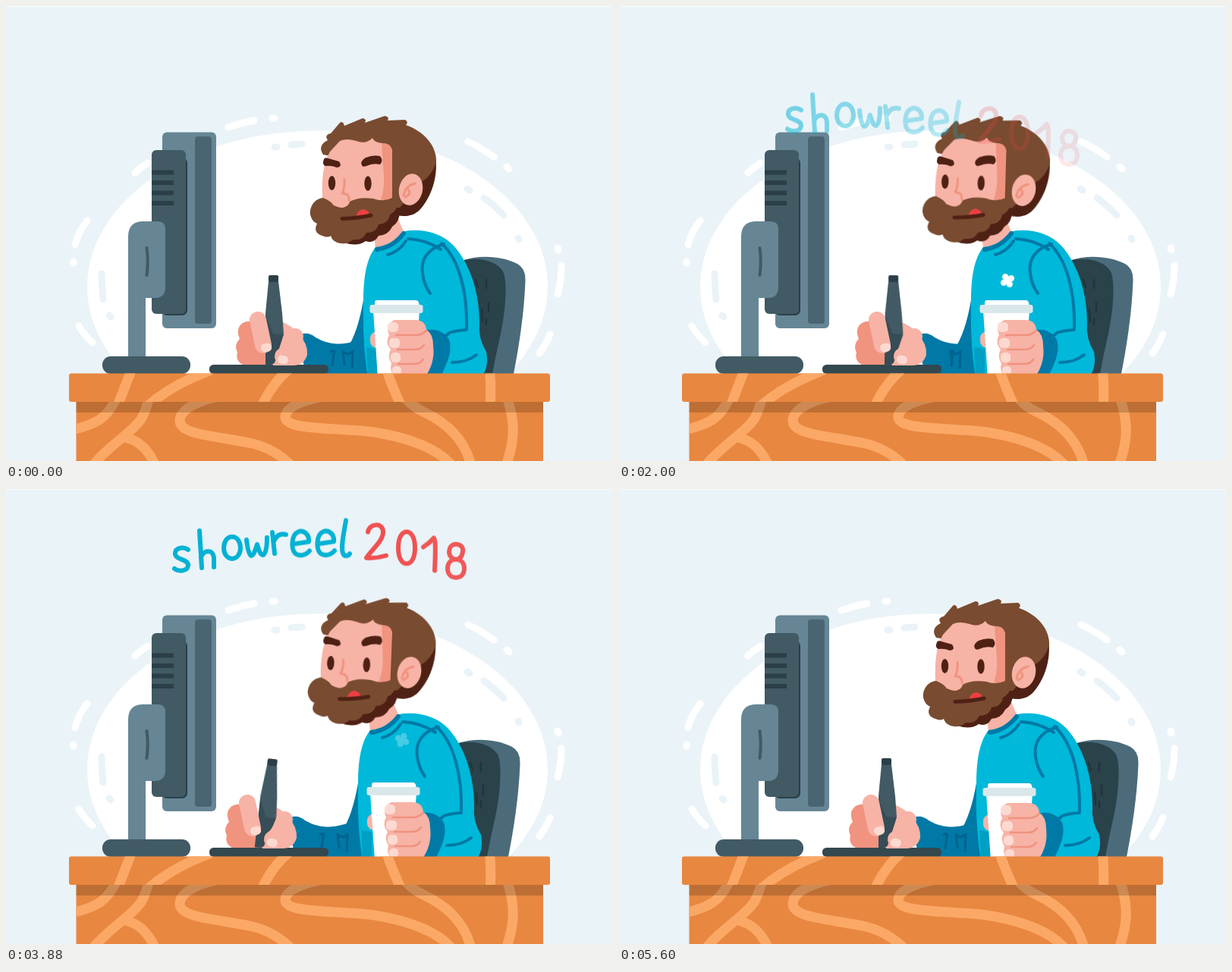
These frames come from a looping animation (800 by 600 pixels, 5.64 s). An HTML page without scripts:

```html
<!DOCTYPE html>
<html lang="en">
<head>
<meta charset="utf-8">
<title>Showreel</title>
<style>
html, body { margin: 0; width: 100%; height: 100%; overflow: hidden; background: #eaf3f8; }
svg { display: block; width: 100vw; height: 100vh; }

:root {
  --loop: 5.64s;
  --skin: #f7b3a6; --blush: #f0937f; --nail: #fddad1;
  --hair: #794b30; --dark: #4f2114;
  --shirt: #00b8d9; --navy: #0079a6;
  --steel: #668696; --slate: #415a64; --coal: #2b3f48;
}

.line { fill: none; stroke-linecap: round; stroke-linejoin: round; }
.move { animation: var(--loop) ease-in-out infinite; }

.chair, .body { animation-name: sway; }
.cup { animation-name: cup; }
.head { animation-name: nod; transform-origin: 534px 242px; }
.brows { animation-name: brows; }
.tongue { animation-name: lick; }
.hand { animation-name: draw; }
.pen { animation-name: tilt; transform-origin: 350px 470px; }
.puff { animation: steam 805.714ms -711.714ms infinite; }

@keyframes sway {
  0%, 99.29%, 100% { transform: none; }
  16.31% { transform: translateX(-9px); }
  35.46% { transform: translateX(-7px); }
  56.03% { transform: translateX(-10px); }
  68.79% { transform: translateX(-7px); }
  78.72% { transform: translateX(-8px); }
}
@keyframes cup {
  0%, 99.29%, 100% { transform: none; }
  16.31% { transform: translate(-5px, -1px); }
  35.46% { transform: translate(-4px, 0); }
  56.03% { transform: translate(-8px, 0); }
  68.79% { transform: translate(-4px, -1px); }
  78.72% { transform: translate(-6px, 2px); }
}
@keyframes nod {
  0%, 99.29%, 100% { transform: none; }
  16.31% { transform: translate(-4px, 1px) rotate(3deg); }
  35.46% { transform: translate(0, 1px) rotate(1.6deg); }
  56.03% { transform: translate(-18px, 0) rotate(-4deg); }
  68.79% { transform: translate(-2px, 0) rotate(2.2deg); }
  78.72% { transform: translate(-11px, 0) rotate(-3.2deg); }
}
@keyframes brows {
  0%, 35.46%, 78.72%, 100% { transform: none; }
  56.03% { transform: translate(2px, -5px); }
}
@keyframes lick {
  0%, 56.03%, 99.29%, 100% { transform: none; }
  78.72% { transform: translate(-14px, 1px); }
}
@keyframes draw {
  0%, 99.29%, 100% { transform: none; }
  8.16% { transform: translateX(9px); }
  16.31% { transform: translateX(-7px); }
  25.9% { transform: translateX(-12px); }
  35.46% { transform: translateX(8px); }
  45.7% { transform: translateX(-11px); }
  56.03% { transform: translateX(-7px); }
  62.4% { transform: translateX(8px); }
  68.79% { transform: translateX(-14px); }
  78.72% { transform: translateX(14px); }
  89% { transform: translateX(-8px); }
}
@keyframes tilt {
  0%, 99.29%, 100% { transform: none; }
  16.31% { transform: rotate(.3deg); }
  35.46% { transform: rotate(.6deg); }
  56.03% { transform: rotate(5deg); }
  68.79% { transform: rotate(6.5deg); }
  78.72% { transform: rotate(-2deg); }
}
@keyframes steam {
  0% { transform: translate(504px, 389px) scale(.4); opacity: 1; }
  37% { transform: translate(516px, 362px) rotate(15deg); opacity: 1; }
  70% { transform: translate(526px, 332px) rotate(70deg); opacity: .28; }
  80% { transform: translate(526px, 330px) rotate(80deg); opacity: .08; }
  87%, 100% { transform: translate(526px, 328px) rotate(85deg); opacity: 0; }
}

.title path {
  transform-box: fill-box; transform-origin: 50% 50%;
  animation: rise var(--loop) infinite both, lean var(--loop) infinite both;
  animation-delay: calc(var(--i) * 80ms);
}
.title .zero { animation-delay: calc(var(--i) * 80ms), 80ms; }
@keyframes rise {
  0%, 5.674% { translate: 0 118px; opacity: 0; animation-timing-function: cubic-bezier(.37, 0, .63, 1); }
  64.18%, 79.43% { translate: 0 0; opacity: 1; }
  83.7%, 100% { translate: 0 0; opacity: 0; }
}
@keyframes lean {
  0%, 75.2% { transform: none; }
  77.3% { transform: skewX(-15deg); }
  83.7%, 100% { transform: none; }
}
</style>
</head>
<body>
<svg viewBox="0 0 800 600" role="img" aria-label="showreel 2018">
  <defs>
    <clipPath id="top"><rect x="83" y="484.500" width="634" height="37.500" rx="3"/></clipPath>
    <clipPath id="front"><rect x="92.500" y="522" width="615.500" height="78"/></clipPath>
  </defs>

  <rect width="800" height="600" fill="#eaf3f8"/>
  <rect width="800" height="1" fill="#f8fbfd"/>

  <!-- backdrop -->
  <ellipse cx="410.500" cy="370" rx="303.500" ry="205.500" fill="#fff"/>
  <g class="line" stroke="#fff" stroke-width="9">
    <path d="M293 160Q310 154 327 151M351 148h3M609 179Q627 187 643 199M660 212l3 3M170 220Q178 212 187 207"/>
    <path d="M107 283Q95 298 91 315M89 337v2M727 319l1 3M732 342Q732 362 727 380M96 422Q104 435 114 444M717 433Q712 446 703 458"/>
  </g>
  <g class="line" stroke="#eaf3f8" stroke-width="9">
    <path d="M354 186h3M376 183l14-1M608 241l3 2M630 253Q644 263 656 276M675 306l1 2M126 353Q126 371 128 387M136 408l2 2"/>
  </g>

  <!-- monitor -->
  <rect x="206" y="166.500" width="71" height="258.500" rx="6" fill="var(--steel)"/>
  <rect x="249" y="172" width="22" height="247" rx="4" fill="#4a6572"/>
  <rect x="205" y="200" width="34" height="208" rx="7" fill="var(--coal)"/>
  <rect x="192" y="190" width="45" height="216" rx="6" fill="var(--slate)"/>
  <path d="M192 219.500h29M192 233h29M192 246.500h29M192 260h29" stroke="var(--coal)" stroke-width="6"/>
  <path d="M161 465V304Q161 284 181 284H200Q210 284 210 294V371Q210 385 196 385H184V465Z" fill="var(--steel)"/>
  <path d="M185.500 319Q188 337 185.500 355" class="line" stroke="var(--slate)" stroke-width="4"/>
  <rect x="127" y="462" width="116" height="23" rx="11" fill="var(--slate)"/>

  <!-- chair -->
  <g class="move chair">
    <path d="M600 336C625 327 655 330 674 340Q685 346 684.500 362C683 405 676 450 668 490H600Z" fill="#4b6b7b"/>
    <path d="M600 336C625 330 647 337 655 350C661 362 659 400 652 432Q645 462 640 490H600Z" fill="#2a424a"/>
    <path d="M619 361l3 10M633 361v11M636 391v12M627 400l1 16M633 412v8" class="line" stroke="#1f343c" stroke-width="2.500"/>
  </g>

  <!-- far sleeve -->
  <g class="move hand">
    <path d="M384 437C391 429 401 431 408 437C425 447 443 447 456 443L510 430V488H396Z" fill="var(--navy)"/>
    <path d="M428 456Q434 452 432 459L430 474" class="line" stroke="#00638f" stroke-width="3"/>
  </g>

  <!-- torso -->
  <g class="move body">
    <path d="M484 285L487 322L526 302L514 274Z" fill="var(--skin)"/>
    <path d="M484 303Q504 298 516 280L512 270L484 285Z" fill="var(--blush)"/>
    <path d="M473 376C468 408 462 430 453 446L455 488H484V376Z" fill="var(--navy)"/>
    <path d="M487 318C476 332 471 354 471 390C470 425 472 462 477 490H626Q637 477 633 456Q622 438 624 418C624 380 613 342 590 316C574 299 548 293 525 297Q512 315 487 318Z" fill="var(--shirt)"/>
    <path d="M475 450L489 452V490H477Z" fill="#009fc4"/>
    <path d="M444 455l2 18M444 456Q452 462 457 455L456 477" class="line" stroke="#00638f" stroke-width="3"/>
    <g class="line" stroke="var(--navy)" stroke-width="4">
      <path d="M489 321Q510 318 524 300" stroke-width="6"/>
      <path d="M503 328Q518 324 527 310M530 307Q553 308 573 321"/>
      <path d="M577 314C556 320 546 334 549 353Q551 368 559 379M574 313C597 334 608 376 607 424"/>
      <path d="M560 432Q577 440 584 431Q592 428 607 427M588 470Q607 470 620 460"/>
    </g>
    <path d="M550 429C564 423 578 429 584 440C589 455 581 472 572 490H548Z" fill="var(--navy)"/>
  </g>

  <!-- head -->
  <g class="move head">
    <path d="M566 198C570 226 560 252 546 268C536 279 520 279 508 273L518 225Z" fill="var(--dark)"/>
    <path d="M446 312Q463 318 474 310Q485 314 491 303Q504 302 509 291Q519 285 519 270L500 262L446 290Z" fill="var(--dark)"/>
    <path d="M418 196Q410 184 424 177Q419 170 428 168L440 154Q444 151 446 158L470 148Q476 149 473 154L499 145Q506 146 503 151L526 150Q531 153 527 157C553 166 568 186 567 206Q561 224 549 231L519 266H500L440 200Z" fill="var(--hair)"/>
    <path d="M427 192C418 207 416 228 417 253L430 268H505Q511 260 509 250V190Q507 182 497 181Q485 180 483 174Q474 183 462 178Q448 174 440 178Z" fill="var(--skin)"/>
    <path d="M495 181Q508 180 509 192V256L494 256Q499 240 498 225Z" fill="var(--blush)"/>
    <path d="M509 184V253Q498 259 484 254Q464 251 451 259Q442 268 432 263Q428 257 418 253C407 254 400 264 401 275Q403 284 410 287Q404 299 417 303Q424 306 428 303C431 314 448 317 457 308Q470 310 475 299Q488 299 491 288Q504 287 506 275Q518 270 520 245Z" fill="var(--hair)"/>
    <path d="M434 228L432 255Q432 266 443 266Q454 264 453 254Q451 247 444 246L447 228Z" fill="var(--skin)"/>
    <path d="M446 229Q447 239 443 247Q453 247 452 256" class="line" stroke="var(--blush)" stroke-width="3"/>
    <g fill="var(--dark)">
      <ellipse cx="429.500" cy="233.500" rx="4.700" ry="9.500"/>
      <ellipse cx="477" cy="234" rx="4.700" ry="9.800"/>
      <g class="move brows">
        <path d="M419 202Q420 199 425 201L439 205Q444 212 436 213Q429 210 421 211Q416 209 419 202Z"/>
        <path d="M469 210Q466 205 474 200Q484 196 493 198Q498 204 493 209Q483 207 475 211Q470 213 469 210Z"/>
      </g>
    </g>
    <path class="move tongue" d="M461 278Q464 268 471 268Q478 269 480 277Z" fill="#ee3f43"/>
    <path d="M443 280.500Q463 280 481 276" class="line" stroke="var(--dark)" stroke-width="5"/>
    <ellipse cx="533.500" cy="242" rx="15.500" ry="21" transform="rotate(12 533.500 242)" fill="var(--skin)"/>
    <path d="M524 250Q526 237 539 234M529 241Q536 247 526 252" class="line" stroke="var(--blush)" stroke-width="3"/>
  </g>

  <!-- coffee -->
  <g class="move cup">
    <g class="puff" fill="#fff">
      <circle cx="-4" cy="-4" r="4"/><circle cx="4" cy="-4" r="4"/>
      <circle cx="-4" cy="4" r="4"/><circle cx="4" cy="4" r="4"/>
      <circle r="4"/>
    </g>
    <rect x="480" y="429" width="20" height="22" rx="9" fill="var(--skin)"/>
    <path d="M484 402H545L538 490H490Z" fill="#fff"/>
    <path d="M486 396V391Q486 388 489 388H540Q543 388 544 391L545 396Z" fill="#fff"/>
    <rect x="479.500" y="394" width="70" height="11" rx="3" fill="#d9e7eb"/>
    <path d="M512 414H541Q553 415 554 427Q563 432 563 448Q566 470 552 490H512Q505 480 508 471Q502 462 507 453Q499 444 505 434Q499 420 512 414Z" fill="var(--skin)"/>
    <path d="M514 434H540Q548 434 554 428M516 453H539Q547 453 551 447M517 472H538Q546 472 550 466" class="line" stroke="var(--blush)" stroke-width="2.500"/>
    <g fill="var(--nail)">
      <rect x="503" y="417" width="14" height="13" rx="5"/>
      <rect x="505" y="438" width="14" height="13" rx="5"/>
      <rect x="507" y="457" width="13" height="13" rx="5"/>
      <rect x="509" y="475" width="12" height="12" rx="5"/>
    </g>
  </g>

  <!-- pen hand -->
  <rect x="268" y="473" width="157" height="12" rx="5.500" fill="#33484f"/>
  <g class="move hand">
    <path d="M312 418Q327 410 344 430L352 473H312Q302 468 305 457Q300 447 308 439Q302 425 312 418Z" fill="var(--blush)"/>
    <path d="M358 414Q379 422 386 433Q398 445 397 460Q393 474 378 474H352Z" fill="var(--skin)"/>
    <g class="move pen">
      <path d="M346 363H359L364 405L366 432L354 470Q351 474 342 473V405Z" fill="var(--slate)"/>
      <path d="M342 408L352 432L366 433L354 470Q351 474 342 473Z" fill="#364c56"/>
      <rect x="346" y="355" width="13" height="9" rx="2" fill="var(--coal)"/>
    </g>
    <path d="M332 414L339 447" class="line" stroke="var(--skin)" stroke-width="22"/>
    <rect x="336" y="445" width="14" height="11" rx="5" fill="var(--nail)" transform="rotate(-12 343 450)"/>
    <path d="M381 436Q375 456 365 462" class="line" stroke="var(--skin)" stroke-width="22"/>
    <rect x="358" y="461" width="14" height="11" rx="5" fill="var(--nail)" transform="rotate(12 365 466)"/>
  </g>

  <!-- desk -->
  <g clip-path="url(#front)">
    <rect x="92" y="522" width="616" height="78" fill="#e88740"/>
    <g class="line" stroke="#fba866" stroke-width="13">
      <path d="M148 512Q138 535 124 545Q110 554 86 559M190 512C186 526 184 535 178 545C163 566 140 575 114 606M160 570Q183 575 197 606"/>
      <path d="M290 514C255 518 229 532 229 547C229 566 280 567 325 577Q354 584 376 606"/>
      <path d="M425 514C390 519 367 530 368 543C371 560 440 556 485 562Q560 574 588 606"/>
      <path d="M522 510Q530 526 552 536Q602 560 613 606M658 510C673 550 670 575 659 606"/>
    </g>
    <rect x="92" y="522" width="616" height="14" opacity=".19"/>
  </g>
  <g clip-path="url(#top)">
    <rect x="83" y="484" width="634" height="38" fill="#e88740"/>
    <g class="line" stroke="#fba866" stroke-width="13">
      <path d="M166 478L146 530M268 481Q215 501 184 530M374 478Q350 498 336 530M501 478Q508 500 522 530M637 478Q640 500 638 530"/>
    </g>
  </g>

  <!-- lettering -->
  <g class="title line" stroke-width="6">
    <g stroke="#00b2d4">
      <path style="--i:0" d="M240 80C233 75 222 78 223 86C224 94 241 92 240 101C239 109 227 109 222 105"/>
      <path style="--i:1" d="M255 55L258 104M257 90C261 80 273 79 274 91V103"/>
      <path style="--i:2" d="M298 63C305 63 309 70 309 78S304 92 298 92S287 86 287 78S291 63 298 63Z"/>
      <path style="--i:3" d="M317 67C318 76 320 86 323 88C327 88 329 78 331 73C333 80 335 87 339 87C343 84 344 72 344 64"/>
      <path style="--i:4" d="M351 57L354 85M353 69Q358 57 369 60"/>
      <path style="--i:5" d="M379 72L399 69C400 59 392 53 385 56C376 60 375 79 382 85C388 89 396 86 400 81"/>
      <path style="--i:6" d="M412 71L432 68C433 58 425 52 418 55C409 59 408 78 415 84C421 88 429 85 433 80"/>
      <path style="--i:7" d="M448 39C445 57 441 75 444 82C446 88 451 86 453 83"/>
    </g>
    <g stroke="#f04a4a">
      <path style="--i:8" d="M477 53C479 41 497 40 497 53C497 65 482 76 475 87Q488 88 501 84"/>
      <path class="zero" style="--i:9" d="M528 51C535 51 539 60 539 72S535 93 528 93S517 84 517 72S521 51 528 51Z"/>
      <path style="--i:10" d="M550 69Q558 64 564 57Q567 58 565 100"/>
      <path style="--i:11" d="M593 63C599 63 603 67 602 73S598 83 593 83S584 78 584 73S587 63 593 63ZM593 83C600 83 604 88 604 95S600 107 593 107S582 102 582 95S586 83 593 83Z"/>
    </g>
  </g>
</svg>
</body>
</html>
```
